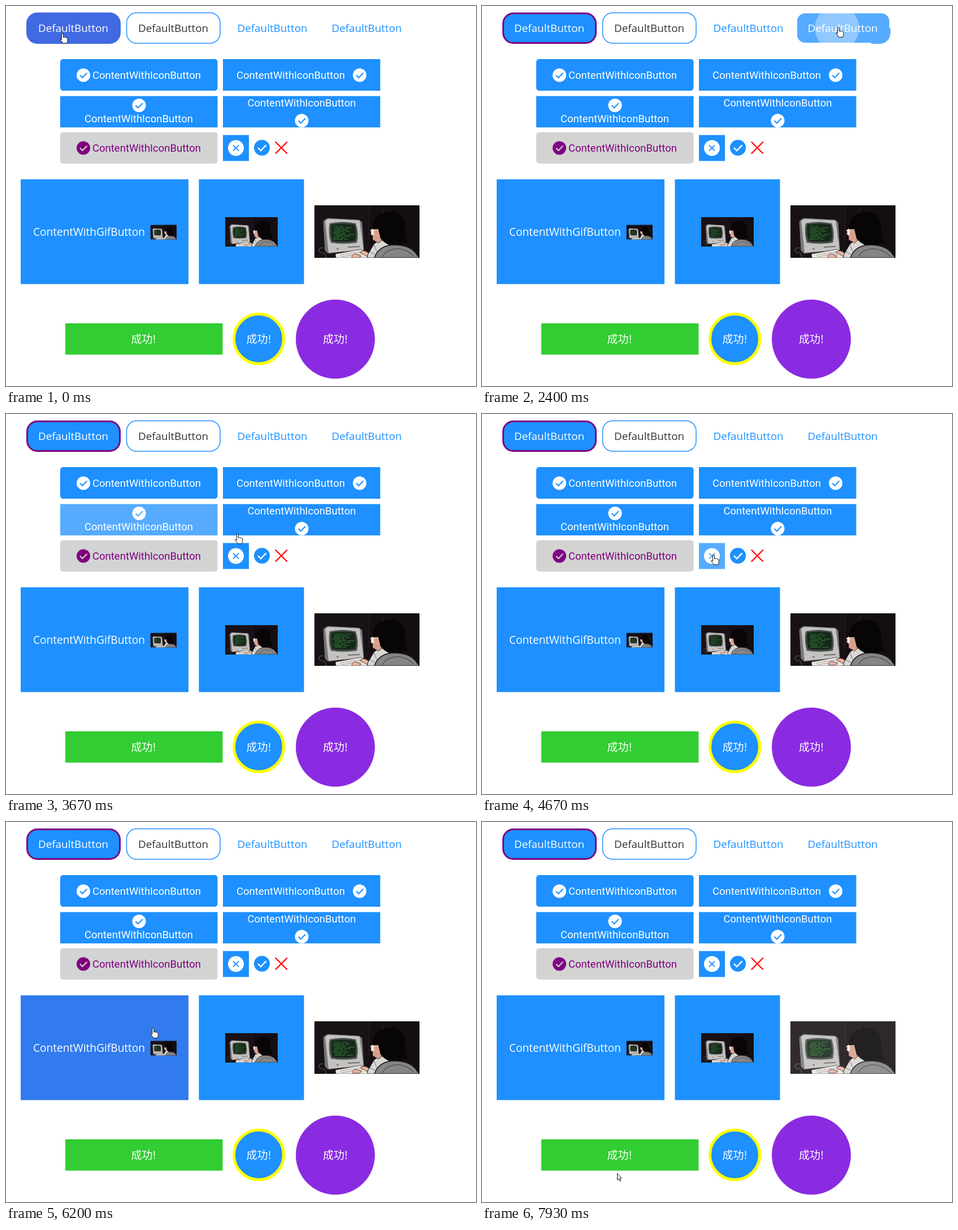
An HTML page for the animation above (8000 ms loop, 832 px wide and 673 px high).

```html
<!DOCTYPE html>
<html lang="en">
<head>
<meta charset="utf-8">
<title>Buttons</title>
<style>
  html, body { margin: 0; width: 100%; height: 100%; overflow: hidden; background: #fff; }
  svg { display: block; }
  text { text-anchor: middle; }
  .ui { font: 18.85px "Open Sans", "Noto Sans", sans-serif; }
  .icon { font: 18.5px Roboto, sans-serif; }
  .cjk { font: 19px "Noto Sans CJK SC", "Noto Sans CJK", sans-serif; }
</style>
</head>
<body>
<svg id="stage" width="832" height="673" viewBox="0 0 832 673"></svg>
<script>
const BLUE = '#1e90ff', PURPLE = '#800080', GREY = '#d3d3d3';
const stage = document.getElementById('stage');
const $ = id => document.getElementById(id);

const rect = (x, y, w, h, fill, r = 0, extra = '') =>
  `<rect x="${x}" y="${y}" width="${w}" height="${h}" rx="${r}" fill="${fill}" ${extra}/>`;
const disc = (x, y, r, fill, extra = '') =>
  `<circle cx="${x}" cy="${y}" r="${r}" fill="${fill}" ${extra}/>`;
const label = (x, y, s, fill, cls, extra = '') =>
  `<text x="${x}" y="${y}" fill="${fill}" class="${cls}" ${extra}>${s}</text>`;
const line = (d, color, width) =>
  `<path d="${d}" fill="none" stroke="${color}" stroke-width="${width}"/>`;
const group = (id, ...parts) => `<g id="${id}">${parts.join('')}</g>`;

const check = (x, y, r, fill, mark) => disc(x, y, r, fill) +
  line(`M${x - r * .5} ${y}l${r * .36} ${r * .37}l${r * .68} ${-r * .7}`, mark, r * .17);
const cross = (x, y, s, color, width) =>
  line(`M${x - s} ${y - s}l${2 * s} ${2 * s}M${x + s} ${y - s}l${-2 * s} ${2 * s}`, color, width);
const iconText = (x, y, fill = '#fff') => label(x, y, 'ContentWithIconButton', fill, 'icon');
const plainText = (x, fill, extra) => label(x, 46, 'DefaultButton', fill, 'ui', extra);
const scene = (x, y, w, h) => `<svg x="${x}" y="${y}" width="${w}" height="${h}"
  viewBox="0 0 186 93" preserveAspectRatio="none"><use href="#scene"/></svg>`;

const sceneArt = () => `<g id="scene">
  ${rect(0, 0, 186, 93, '#181216')}
  ${rect(97, 0, 89, 93, '#140e12')}
  ${line('M97 0V60M125 0L121 14', '#2b2028', 1)}
  ${line('M20 76C5 72 5 84 14 84S16 92 22 93', '#4b464a', 1.5)}
  <path d="M15 28L23 22L79 25L85 30L88 78L24 86L18 80Z" fill="#777" stroke="#111"/>
  <path d="M19 27L25 24L80 27L87 79L25 84Z" fill="#c4c3c2"/>
  <path d="M27 32Q49 27 73 32Q79 49 75 66Q51 70 29 66Q24 49 27 32Z" fill="#454942" stroke="#8a8a88"/>
  <path d="M30 34Q50 31 71 34Q75 49 72 63Q50 66 32 63Q28 49 30 34Z" fill="#17281b"/>
  <path id="code" fill="none" stroke="#2f7432" stroke-width="1.2"/>
  ${line('M59 74L80 73', '#555', 1.5)}
  ${disc(41, 77, 1.5, '#b5443b')}
  <path d="M37 86L82 78L98 85V93H38Z" fill="#e7e6e3" stroke="#222" stroke-width=".7"/>
  ${line('M45 88L86 82M48 91L90 85', '#a5a29d', 1.2)}
  <g id="hands" fill="#e5b39e" stroke="#4b2923" stroke-width=".8">
    <path d="M66 90Q70 84 76 87L83 90L78 93H67Z"/>
    <path d="M80 83Q87 79 92 82L99 87L94 91L87 87Z"/>
  </g>
  <path d="M94 88L105 69Q113 61 128 61L154 70L155 93H94Z" fill="#d8d7d5" stroke="#151113"/>
  ${line('M105 70L111 83M98 82L107 87', '#898786', 1.2)}
  <path d="M107 34L101 43L99 51L103 54V61L114 67L124 56L120 36Z" fill="#d9a08c" stroke="#251417" stroke-width=".7"/>
  ${line('M99 45L110 42', '#eee', 2)}
  <path d="M103 43C104 19 118 11 136 11C154 12 162 25 161 45Q161 59 169 67L156 68L148 75Q128 72 117 59L113 42Z" fill="#080507"/>
  ${rect(101, 42, 4, 11, '#f4efeb', 2)}
  <path d="M106 93Q114 70 143 70Q171 71 181 87L186 93Z" fill="#858585" stroke="#171417" stroke-width="1.5"/>
  ${line('M119 93Q126 78 146 77Q164 77 177 91', '#555', 1.4)}
</g>`;

const ring = (id, x, w, width) => rect(x, 12, w, 54, 'none', 18,
  `id="${id}" stroke="${BLUE}" stroke-width="${width}" pathLength="411"`);

stage.innerHTML = `<defs>${sceneArt()}
  <clipPath id="clip4">${rect(558, 13, 163, 52, '#000', 14)}</clipPath></defs>` + [
  rect(37.5, 13, 164, 52.5, BLUE, 18, 'id="fill1" stroke-width="3"'),
  plainText(119, '#fff'),
  group('b2', ring('ring2', 213.5, 165.5, 1.5), plainText(296, '#333')),
  group('b3', plainText(471.5, BLUE)),
  group('b4',
    `<g id="face4">${rect(558, 13, 163, 52, BLUE, 14)}${ring('ring4', 558, 164, 2)}
     <g clip-path="url(#clip4)">${disc(628.5, 39, 0, '#fff', 'id="ripple"')}</g></g>`,
    plainText(638.5, BLUE, 'id="text4"')),
  group('c1', rect(96, 94, 278.5, 56, BLUE, 5), check(137, 122.5, 12, '#fff', BLUE), iconText(249, 129)),
  group('c2', rect(384, 94, 278.5, 56, BLUE), iconText(504, 129), check(626, 122.5, 12, '#fff', BLUE)),
  group('c3', rect(96, 159.5, 278.5, 55.5, BLUE), check(235.5, 176, 12, '#fff', BLUE), iconText(235, 205.5)),
  group('c4', rect(384, 159.5, 278.5, 55.5, BLUE), iconText(523.5, 177.5), check(523.5, 203, 12, '#fff', BLUE)),
  rect(96, 223.5, 278.5, 55.5, GREY, 5), check(137, 251.5, 12, PURPLE, GREY), iconText(249, 258, PURPLE),
  group('d1', rect(384, 228.5, 46, 46, BLUE), disc(407, 251.5, 14, '#fff'), cross(407, 251.5, 5, BLUE, 1.8)),
  group('d2', check(453, 251, 14, BLUE, '#fff')),
  group('d3', rect(476, 223.5, 22.5, 55.5, BLUE, 0, 'id="back3"'), cross(487.3, 251, 10.5, '#f00', 2.2)),
  rect(26, 307, 297, 185.5, BLUE, 0, 'id="g1"'),
  label(147, 406.5, 'ContentWithGifButton', '#fff', 'ui', 'style="font-size:19.1px"'),
  scene(255.5, 387.5, 46.5, 26),
  rect(341.5, 307, 186, 185.5, BLUE, 0, 'id="g2"'),
  scene(388, 374, 93, 52),
  group('g3', scene(546, 353, 186, 93)),
  rect(105, 562, 278.5, 55.5, '#32cd32'), label(243.5, 597, '成功!', '#fff', 'cjk'),
  disc(447.5, 589.5, 44, BLUE, 'stroke="#ff0" stroke-width="5"'), label(447.5, 597, '成功!', '#fff', 'cjk'),
  disc(583, 590, 70, '#8a2be2'), label(583, 597, '成功!', '#fff', 'cjk'),
  group('tip', rect(439, 432, 75, 31.5, '#e25a4b', 5),
    label(476.3, 452.5, 'GifButton', '#f8e9e6', 'ui', 'style="font-size:13.4px"')),
  `<g id="pointer" fill="#fff" stroke="#111" stroke-linejoin="round">
    <path id="hand" d="M-1.5 11V1.5a1.5 1.5 0 0 1 3 0V7a1.5 1.5 0 0 1 2.6.4 1.5 1.5 0 0 1 2.6.5
      1.4 1.4 0 0 1 2.3 1.2V13q0 2-1.5 4.5H.5Q-1 14-4 11.5q-.8-1.8 1-1.5z"/>
    <path id="arrow" d="M.5.5V12l2.6-2.3L5 14l1.8-.8L5 9h3.3z"/></g>`
].join('');

// time, x, y of the pointer tip
const path = [
  [0, 100, 48.5], [130, 100, 48.5], [650, 203, 44], [870, 318.5, 37.5], [1350, 375, 38],
  [1850, 520, 40], [2250, 631, 37.5], [2500, 631, 38], [2680, 635, 70], [2850, 600, 95],
  [3100, 385, 120], [3380, 250, 155], [3530, 290, 190], [3670, 409.5, 212.5], [3900, 490, 155],
  [4100, 500, 125], [4350, 430, 214], [4600, 405, 248], [4950, 430, 255], [5170, 470, 255],
  [5500, 485, 252], [5800, 477.5, 259.5], [6000, 400, 290], [6200, 260, 365], [6400, 323, 405],
  [6600, 420, 415], [6730, 439, 420], [6880, 455, 440], [7050, 527, 480], [7250, 580, 435],
  [7600, 590, 425], [7720, 500, 510], [7800, 390, 610], [7870, 241, 622], [7930, 239, 622], [8000, 239, 622]
];

// in/out times of the buttons that turn translucent
const fades = {
  b2: [[680, 1350]], b3: [[1400, 1950]], b4: [[2150, 2480]],
  c1: [[3100, 3350]], c2: [[2850, 3100], [3900, 4150]], c3: [[3380, 3700]], c4: [[3720, 3900], [4080, 4230]],
  d1: [[4480, 4920]], d2: [[4930, 5160]], d3: [[5160, 6000]], g3: [[7250, 7820]]
};

const clamp = v => Math.max(0, Math.min(1, v));
const mix = (a, b, k) => a + (b - a) * k;
const ramp = (t, from, to) => clamp((t - from) / (to - from));
const hover = (t, spans) => Math.max(...spans.map(([a, b]) =>
  Math.min(ramp(t, a, a + 150), 1 - ramp(t, b, b + 200))));
const blend = (a, b, k) => `rgb(${a.map((v, i) => Math.round(mix(v, b[i], k)))})`;
const set = (id, attrs) => { for (const k in attrs) $(id).setAttribute(k, attrs[k]); };

const sky = [30, 144, 255], royal = [65, 105, 225], plum = [128, 0, 128], white = [255, 255, 255];

// The outline grows both ways from the bottom right corner.
function drawRing(id, t, start) {
  const total = 411, len = Math.min(total, Math.max(0, (t - start) * .453));
  set(id, {
    'stroke-dasharray': len < total ? `${len} ${total - len}` : 'none',
    'stroke-dashoffset': len / 2 - 194,
    'stroke-opacity': len > 0 ? 1 : 0
  });
}

function movePointer(t) {
  const i = path.findIndex(p => p[0] > t);
  const a = path[i - 1], b = path[i], k = ramp(t, a[0], b[0]);
  set('pointer', { transform: `translate(${mix(a[1], b[1], k)} ${mix(a[2], b[2], k)})` });
  const arrow = t > 7640 || (t > 2640 && t < 2850) || (t > 6020 && t < 6130);
  set('hand', { opacity: arrow ? 0 : 1 });
  set('arrow', { opacity: arrow ? 1 : 0 });
}

function typing(t) {
  const step = Math.floor(t / 130);
  let d = '';
  for (let row = 0; row < 9; row++) {
    const n = (row + step % 3) * 7;
    d += `M${33 + n % 4} ${37 + row * 2.9}h${9 + n % 12}m3 0h${4 + n % 9}`;
  }
  set('code', { d });
  set('hands', { transform: `translate(${step % 2} ${step % 2 ? -1 : 0})` });
}

function draw(t) {
  for (const id in fades) set(id, { opacity: 1 - .25 * hover(t, fades[id]) });

  const leave = ramp(t, 600, 820);
  set('fill1', {
    fill: blend(royal, sky, leave),
    stroke: t < 930 ? blend(royal, [42, 148, 255], leave) : blend(sky, plum, ramp(t, 930, 1500))
  });

  drawRing('ring2', t, t < 680 ? -1000 : 720);
  drawRing('ring4', t, 2283);
  const on4 = hover(t, fades.b4);
  set('face4', { opacity: on4 });
  set('text4', { fill: blend(sky, white, Math.min(on4, 1) || 1 - ramp(t, 2630, 2800) * 1 - (t < 2630)) });
  if (t < 2150 || t > 2680) set('text4', { fill: BLUE });
  set('ripple', { r: Math.max(0, Math.min(110, (t - 2250) * .26)), opacity: .34 * (1 - ramp(t, 2480, 2680)) });

  set('back3', { opacity: hover(t, fades.d3) });
  set('g1', { fill: blend(sky, royal, hover(t, [[6120, 6400]])) });
  set('g2', { fill: blend(sky, royal, hover(t, [[6450, 7050]])) });
  set('tip', { opacity: hover(t, [[6560, 6950]]) });
  typing(t);
  movePointer(t);
}

function tick(now) {
  draw(now % 8000);
  requestAnimationFrame(tick);
}
draw(0);
requestAnimationFrame(tick);
</script>
</body>
</html>
```
